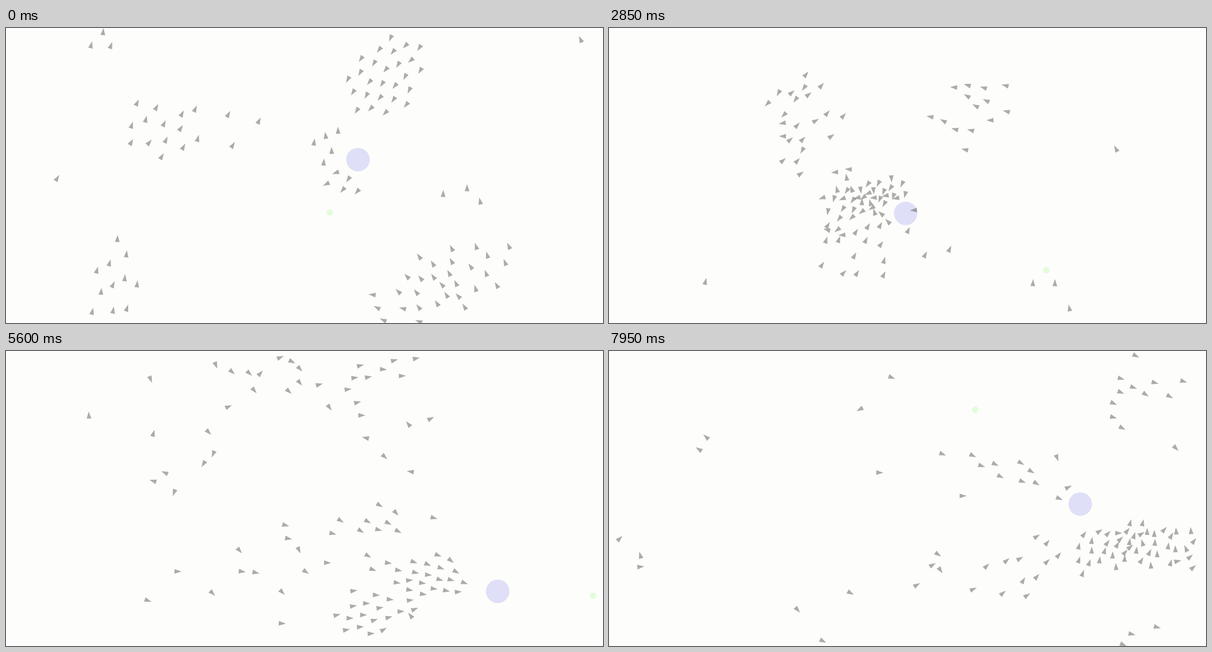
These frames come from a looping animation (1016 by 502 pixels, 8000 ms). An HTML page with a canvas:

```html
<!DOCTYPE html>
<html lang="en">
<head>
<meta charset="utf-8">
<title>Flock</title>
<style>
  html, body { margin: 0; width: 100%; height: 100%; overflow: hidden; background: #fdfdfb; }
  canvas { display: block; }
</style>
</head>
<body>
<canvas id="stage" width="1016" height="502"></canvas>
<script>
const ctx = document.getElementById('stage').getContext('2d');
const LOOP = 8000, STEP = 50, DT = STEP / 1000;
const W = 1003, H = 502;
const SPEED = 118, GAP = 24, LEADER_GAP = 38;
const GOLDEN = Math.PI * (3 - Math.sqrt(5));
const RAD = Math.PI / 180;

let seed = 11;
const rand = () => (seed = (seed * 16807) % 2147483647) / 2147483647;
const spread = amount => (rand() - 0.5) * 2 * amount;
const wrap = (v, size) => ((v % size) + size) % size;

// Food appears one piece at a time; speed is how fast the leader heads for it.
const FOOD = [
  { x: 551, y: 314, speed: 104 },
  { x: 379, y: 270, speed: 138 },
  { x: 744, y: 412, speed: 128 },
  { x: 999, y: 416, speed: 125 },
  { x: 623, y: 100, speed: 185 }
];
const leader = { x: 599, y: 224, goal: 0 };
const boids = [];

// An ellipse of boids, laid out along its heading. It flies an arc (turn, in degrees
// per second) until it joins the chase after the leader (join, in seconds).
function flock({ count = 1, x, y, along = 0, across = 0, heading, turn = 0, join = Infinity, pace = 1 }) {
  const h = heading * RAD, loose = count > 1 ? 0.05 : 0;
  for (let i = 0; i < count; i++) {
    const r = count > 1 ? Math.sqrt((i + 0.5) / count) : 0;
    const u = r * along * Math.cos(i * GOLDEN), v = r * across * Math.sin(i * GOLDEN);
    boids.push({
      x: x + u * Math.cos(h) + v * Math.sin(h),
      y: y - u * Math.sin(h) + v * Math.cos(h),
      heading: h + spread(loose),
      speed: SPEED * pace * (1 + spread(loose)),
      agility: 0.5 + rand() * 1.1,
      tilt: spread(0.2),
      turn: turn * RAD,
      join
    });
  }
}

flock({ count: 14, x: 180, y: 455, along: 100, across: 42, heading: 79, turn: -12.5 });
flock({ count: 13, x: 264, y: 172, along: 52, across: 70, heading: 62, join: 2.8 });
flock({ count: 4, x: 370, y: 165, along: 55, across: 70, heading: 65, join: 2.8 });
flock({ count: 26, x: 645, y: 85, along: 80, across: 58, heading: 235, join: 0 });
flock({ count: 3, x: 585, y: 262, along: 30, across: 22, heading: 225, join: 0 });
flock({ count: 5, x: 545, y: 195, along: 36, across: 24, heading: 90, turn: 50, join: 3.4 });
flock({ count: 14, x: 795, y: 415, along: 50, across: 85, heading: 115, join: 2 });
flock({ count: 11, x: 720, y: 435, along: 55, across: 55, heading: 130, join: 0 });
flock({ count: 5, x: 650, y: 480, along: 60, across: 25, heading: 165, join: 0 });
flock({ count: 3, x: 785, y: 283, along: 25, across: 45, heading: 92, join: 4.4 });
flock({ count: 2, x: 555, y: 262, along: 20, across: 20, heading: 200, turn: -7.5, pace: 0.42 });
flock({ x: 978, y: 20, heading: 110, join: 4 });
flock({ x: 87, y: 256, heading: 68, turn: 6 });

function moveLeader() {
  const f = FOOD[leader.goal];
  const a = Math.atan2(f.y - leader.y, f.x - leader.x);
  leader.x += f.speed * DT * Math.cos(a);
  leader.y += f.speed * DT * Math.sin(a);
  const reached = Math.hypot(f.x - leader.x, f.y - leader.y) < 25;
  if (reached && leader.goal < FOOD.length - 1) leader.goal++;
}

function steer(b, time) {
  if (time < b.join) {
    b.heading += b.turn * DT;
  } else {
    const off = Math.atan2(b.y - leader.y, leader.x - b.x) - b.heading;
    const bend = Math.atan2(Math.sin(off), Math.cos(off));
    const most = b.agility * DT;
    b.heading += Math.max(-most, Math.min(most, bend));
  }
  b.x += b.speed * DT * Math.cos(b.heading);
  b.y -= b.speed * DT * Math.sin(b.heading);
}

// Moves p out of the space around q by a share of the overlap.
function push(p, q, gap, share) {
  const dx = p.x - q.x, dy = p.y - q.y, d = Math.hypot(dx, dy) || 1;
  if (d >= gap) return;
  const k = share * (gap - d) / d;
  p.x += dx * k;
  p.y += dy * k;
}

function separate() {
  for (const b of boids) {
    for (const other of boids) if (other !== b) push(b, other, GAP, 0.12);
    push(b, leader, LEADER_GAP, 0.3);
  }
}

const snapshot = () => ({
  leader: { ...leader },
  boids: boids.map(b => ({ x: wrap(b.x, W), y: wrap(b.y, H), angle: -b.heading - b.tilt }))
});

// The whole flight is worked out once, so each picture depends on the time alone.
function fly() {
  const states = [];
  for (let i = 0; i < 12; i++) separate();
  for (let t = 0; t < LOOP; t += STEP) {
    states.push(snapshot());
    moveLeader();
    for (const b of boids) {
      steer(b, t / 1000);
      b.x = wrap(b.x, W);
      b.y = wrap(b.y, H);
    }
    separate();
  }
  return states;
}

function disc(x, y, r, color) {
  ctx.fillStyle = color;
  ctx.beginPath();
  ctx.arc(x, y, r, 0, Math.PI * 2);
  ctx.fill();
}

function drawBoid({ x, y, angle }) {
  ctx.save();
  ctx.translate(x, y);
  ctx.rotate(angle);
  ctx.beginPath();
  ctx.moveTo(7, 0);
  ctx.lineTo(-5, 4);
  ctx.lineTo(-5, -4);
  ctx.fill();
  ctx.restore();
}

function draw(state) {
  ctx.fillStyle = '#fdfdfb';
  ctx.fillRect(0, 0, 1016, 502);
  const f = FOOD[state.leader.goal];
  disc(f.x, f.y, 5.5, '#e3fcdc');
  disc(state.leader.x, state.leader.y, 20, '#dfdff8');
  ctx.fillStyle = 'rgba(90, 90, 86, 0.5)';
  state.boids.forEach(drawBoid);
}

const states = fly();
const start = performance.now();
function tick() {
  const t = (performance.now() - start) % LOOP;
  draw(states[Math.floor(t / STEP)]);
  requestAnimationFrame(tick);
}
tick();
</script>
</body>
</html>
```
